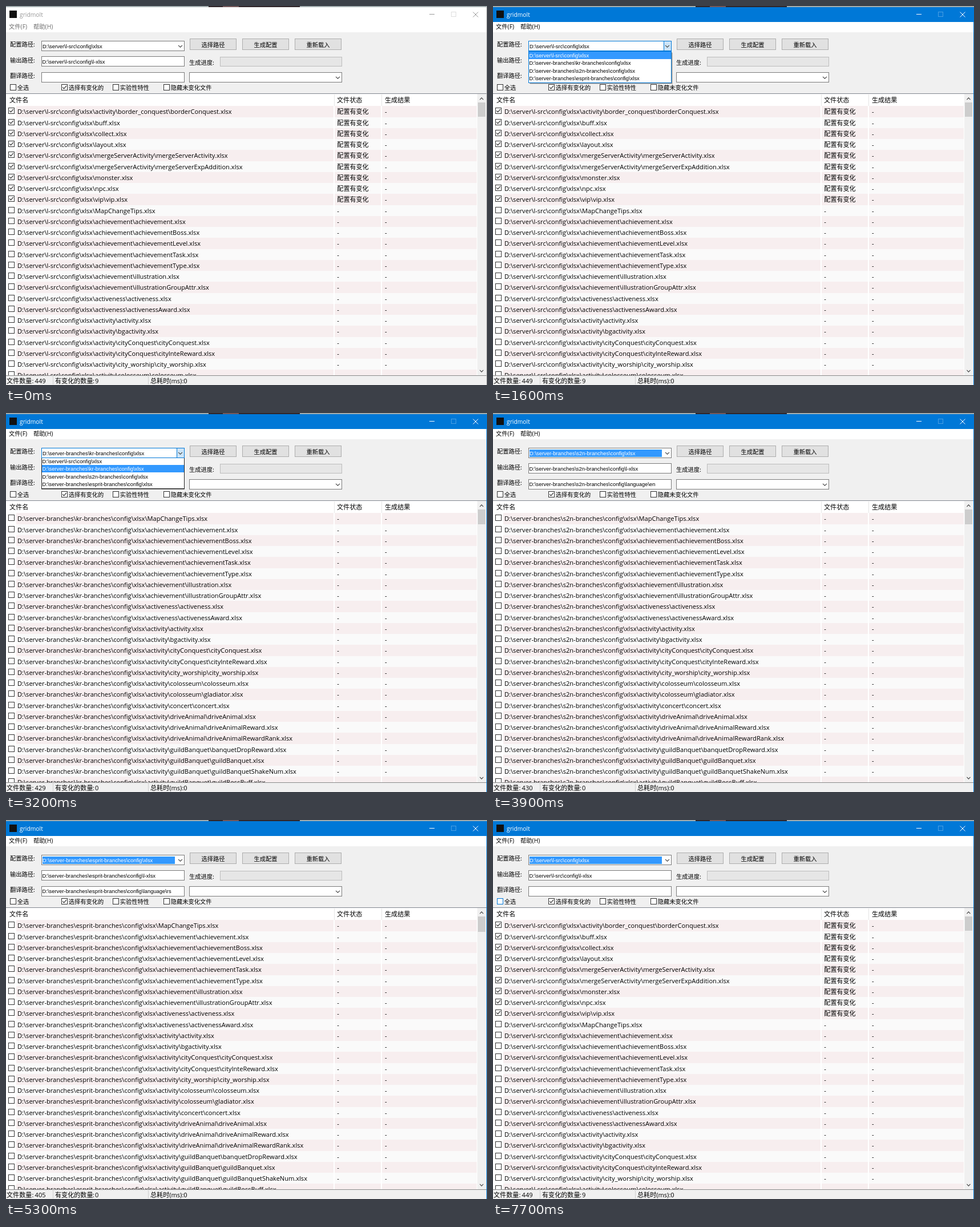
Recreate the animation shown at these times as an HTML page with a canvas. Size 843x664 px, loop 8 s.

```html
<!DOCTYPE html>
<html lang="zh-CN">
<head>
<meta charset="utf-8">
<title>gridmolt</title>
<style>
html, body { margin: 0; width: 100%; height: 100%; overflow: hidden; background: #f0f0f0; }
canvas { display: block; }
</style>
</head>
<body>
<canvas id="stage" width="843" height="664"></canvas>
<script>
const ctx = document.getElementById('stage').getContext('2d');
const LOOP = 8000, ROW = 19.25, ITEM = 13.4;
const LIST_FONT = '11.08px "Open Sans", "Noto Sans CJK SC", "Noto Sans CJK", sans-serif';
const LABEL_FONT = '10.25px "Noto Sans CJK SC", "Noto Sans CJK", sans-serif';
const MENU_FONT = '10.3px "Open Sans", "Noto Sans CJK SC", "Noto Sans CJK", sans-serif';
const FIELD_FONT = '9.4px "Liberation Sans", Arial, sans-serif';
const BLUE = '#0078d7', PICK = '#3399ff', EDGE = [122, 122, 122], DARK = [23, 23, 23];

const projects = [
  { root: 'D:\\server\\l-src\\config\\', lang: '', count: 449, changed: 9, thumb: 25 },
  { root: 'D:\\server-branches\\kr-branches\\config\\', lang: 'kr', count: 429, changed: 0, thumb: 26 },
  { root: 'D:\\server-branches\\s2n-branches\\config\\', lang: 'en', count: 430, changed: 0, thumb: 26 },
  { root: 'D:\\server-branches\\esprit-branches\\config\\', lang: 'rs', count: 405, changed: 0, thumb: 27 }
];
const changedFiles = ['activity\\border_conquest\\borderConquest', 'buff', 'collect', 'layout',
  'mergeServerActivity\\mergeServerActivity', 'mergeServerActivity\\mergeServerExpAddition',
  'monster', 'npc', 'vip\\vip'];
const inDir = (dir, names) => names.split(' ').map(n => dir + '\\' + n);
const files = [
  'MapChangeTips',
  ...inDir('achievement', 'achievement achievementBoss achievementLevel achievementTask achievementType illustration illustrationGroupAttr'),
  ...inDir('activeness', 'activeness activenessAward'),
  ...inDir('activity', 'activity bgactivity'),
  ...inDir('activity\\cityConquest', 'cityConquest cityInteReward'),
  'activity\\city_worship\\city_worship',
  ...inDir('activity\\colosseum', 'colosseum gladiator'),
  'activity\\concert\\concert',
  ...inDir('activity\\driveAnimal', 'driveAnimal driveAnimalReward driveAnimalRewardRank'),
  ...inDir('activity\\guildBanquet', 'banquetDropReward guildBanquet guildBanquetShakeNum guildBossBuff')
];

// Times in ms: [start, value]
const picks = [[0, 0], [2400, 1], [3800, 2], [5300, 3], [6800, 0]];
const menus = [
  { open: 1400, close: 2400, hover: [[0, 0], [2100, 1]] },
  { open: 3100, close: 3800, hover: [[0, 1], [3500, 2]] },
  { open: 4400, close: 5300, hover: [[0, 2], [4800, 3]] },
  { open: 6100, close: 6800, hover: [[0, 3], [6300, 0]] }
];
const comboHot = [[1100, 1400], [2900, 3100], [4000, 4400], [5800, 6100]];
const outputHot = [[2400, 2800], [5600, 5800], [6800, 7200]];
const langHot = [[5300, 5600], [7200, 7500]];

const at = (track, t) => track.filter(k => k[0] <= t).pop()[1];
const clamp = v => Math.max(0, Math.min(1, v));
const heat = (spans, t) => Math.max(...spans.map(([a, b]) => Math.min(clamp((t - a) / 200), clamp((b + 200 - t) / 200))));
const mix = (a, b, k) => `rgb(${a.map((v, i) => Math.round(v + (b[i] - v) * k))})`;

function rect(x, y, w, h, color) {
  ctx.fillStyle = color;
  ctx.fillRect(x, y, w, h);
}
function box(x, y, w, h, fill, edge) {
  rect(x, y, w, h, edge);
  rect(x + 1, y + 1, w - 2, h - 2, fill);
}
function text(str, x, y, font = LABEL_FONT, color = '#000', align = 'left') {
  ctx.font = font;
  ctx.fillStyle = color;
  ctx.textAlign = align;
  ctx.fillText(str, x, y);
}
function line(points, color, width = 1) {
  ctx.beginPath();
  points.forEach(([x, y]) => ctx.lineTo(x, y));
  ctx.strokeStyle = color;
  ctx.lineWidth = width;
  ctx.stroke();
}
function chevron(x, y, dir = 1, size = 3.5) {
  line([[x - size, y - dir * 1.7], [x, y + dir * 1.7], [x + size, y - dir * 1.7]], '#444', 1.1);
}
function check(x, y, on, edge = '#333') {
  box(x, y, 11, 11, '#fff', edge);
  if (on) line([[x + 2.3, y + 5.4], [x + 4.5, y + 7.8], [x + 8.8, y + 2.8]], '#222', 1.1);
}

function drawTitle(active) {
  rect(0, 0, 843, 2, '#a3adaf');
  rect(355, 0, 160, 2, '#30262a');
  rect(380, 0, 28, 2, '#75585a');
  rect(0, 2, 843, 26, active ? BLUE : '#fff');
  rect(0, 28, 843, 18, '#fff');
  rect(6, 8, 13, 13, '#111');
  const ink = active ? '#fff' : '#999';
  text('gridmolt', 24, 18.5, '10.3px "Open Sans", sans-serif', ink);
  rect(742, 14, 9, 1, ink);
  ctx.lineWidth = 1;
  ctx.strokeStyle = active ? '#4b9fe3' : '#dedede';
  ctx.strokeRect(780.5, 10.5, 8, 8);
  line([[818.5, 10.5], [827.5, 19.5]], ink);
  line([[827.5, 10.5], [818.5, 19.5]], ink);
  const menuInk = active ? '#000' : '#6d6d6d';
  text('文件(F)', 5, 39.5, MENU_FONT, menuInk);
  text('帮助(H)', 48, 39.5, MENU_FONT, menuInk);
}

function drawForm(t, project, isOpen, active) {
  text('配置路径:', 7, 71);
  text('输出路径:', 7, 98.5);
  text('翻译路径:', 7, 126);
  text('生成进度:', 321, 102.5);

  const config = project.root + 'xlsx';
  box(62, 61, 251, 18, '#fff', isOpen ? BLUE : mix(EDGE, DARK, heat(comboHot, t)));
  const selected = active && !isOpen;
  if (selected) rect(64, 64, 232, 13, PICK);
  if (isOpen) box(299, 61, 14, 18, '#cce4f7', BLUE);
  text(config, 64, 73.5, FIELD_FONT, selected ? '#fff' : '#000');
  chevron(305.5, 70.5);

  box(62, 88, 251, 18, '#fff', mix(EDGE, DARK, heat(outputHot, t)));
  text(project.root + 'l-xlsx', 63.5, 100.5, FIELD_FONT);
  box(62, 116, 251, 18, '#fff', mix(EDGE, DARK, heat(langHot, t)));
  if (project.lang) text(project.root + 'language\\' + project.lang, 63.5, 128, FIELD_FONT);

  ['选择路径', '生成配置', '重新载入'].forEach((label, i) => {
    box(322 + 92 * i, 57, 82, 20, '#e1e1e1', '#adadad');
    text(label, 363 + 92 * i, 71.5, LABEL_FONT, '#000', 'center');
  });
  box(375, 89, 214, 17, '#e6e6e6', '#bcbcbc');
  box(321, 116, 268, 18, '#fff', '#7a7a7a');
  chevron(581.5, 125.5);

  [[7, '全选'], [97, '选择有变化的'], [187, '实验性特性'], [276, '隐藏未变化文件']].forEach(([x, label], i) => {
    check(x, 137, i === 1, i === 0 && t >= 7500 ? BLUE : '#333');
    text(label, x + 12.7, 147);
  });
}

function drawList(t, project) {
  rect(0, 153, 843, 1, '#828790');
  rect(0, 154, 841, 493, '#fff');
  if (t >= 600 && t < 800) rect(1, 155, 574, 20, '#d9ebf9');
  rect(575, 155, 1, 20, '#e5e5e5');
  rect(658, 155, 1, 20, '#e5e5e5');
  text('文件名', 6, 169, LIST_FONT);
  text('文件状态', 580, 169, LIST_FONT);
  text('生成结果', 664, 169, LIST_FONT);

  ctx.save();
  ctx.beginPath();
  ctx.rect(0, 154, 826, 493);
  ctx.clip();
  const names = (project.changed ? changedFiles : []).concat(files).slice(0, 25);
  names.forEach((name, i) => {
    const top = Math.round(175.4 + ROW * i), bottom = Math.round(175.4 + ROW * (i + 1));
    const color = i % 2 ? '#fafafa' : '#f7eeef';
    [[18, 574], [576, 657], [659, 825]].forEach(([a, b]) => rect(a, top, b - a, bottom - top, color));
    const base = top + 13.6, changed = i < project.changed;
    check(4, top + 3, changed);
    text(project.root + 'xlsx\\' + name + '.xlsx', 20, base, LIST_FONT);
    text(changed ? '配置有变化' : '-', 580.3, base, LIST_FONT);
    text('-', 664, base, LIST_FONT);
  });
  ctx.restore();

  rect(826, 154, 15, 493, '#f0f0f0');
  rect(827, 169, 13, project.thumb, '#cdcdcd');
  chevron(833.5, 162.5, -1, 3);
  chevron(833.5, 639.5, 1, 3);
}

function drawStatus(project) {
  rect(0, 647, 843, 1, '#8a8a8a');
  rect(0, 648, 843, 16, '#f0f0f0');
  rect(82, 649, 1, 14, '#d0d0d0');
  rect(249, 649, 1, 14, '#d0d0d0');
  text('文件数量', 1, 661, LIST_FONT);
  text(':', 45.5, 661, LIST_FONT);
  text(project.count, 50.6, 661, LIST_FONT);
  text('有变化的数量', 86, 661, LIST_FONT);
  text(':', 152, 661, LIST_FONT);
  text(project.changed, 156, 661, LIST_FONT);
  text('总耗时(ms):0', 253, 661, LIST_FONT);
}

function drawMenu(t, menu) {
  const age = t - menu.open;
  const lift = age < 100 ? 28 : age < 200 ? 2 : 0;
  const hover = at(menu.hover, t);
  ctx.save();
  ctx.beginPath();
  ctx.rect(60, 79, 260, 62);
  ctx.clip();
  if (!lift) {
    rect(65, 82, 250, 55, 'rgba(0,0,0,.16)');
    rect(64, 81, 250, 55, 'rgba(0,0,0,.28)');
  }
  box(62, 79 - lift, 251, 56, '#fff', lift ? '#222' : BLUE);
  projects.forEach((p, i) => {
    const top = Math.round(80 + ITEM * i) - lift;
    if (i === hover) rect(63, top, 249, 13, PICK);
    text(p.root + 'xlsx', 63.5, top + 9.8, FIELD_FONT, i === hover ? '#fff' : '#000');
  });
  ctx.restore();
}

function draw(now) {
  const t = Math.floor((now % LOOP) / 100) * 100;
  const project = projects[at(picks, t)];
  const menu = menus.find(m => t >= m.open && t < m.close);
  const active = t >= 1100;
  rect(0, 0, 843, 664, '#f0f0f0');
  drawTitle(active);
  drawForm(t, project, !!menu, active);
  drawList(t, project);
  drawStatus(project);
  rect(842, 2, 1, 662, active ? BLUE : '#aaa');
  if (menu) drawMenu(t, menu);
}

const start = performance.now();
function tick() {
  draw(performance.now() - start);
  requestAnimationFrame(tick);
}
tick();
</script>
</body>
</html>
```
